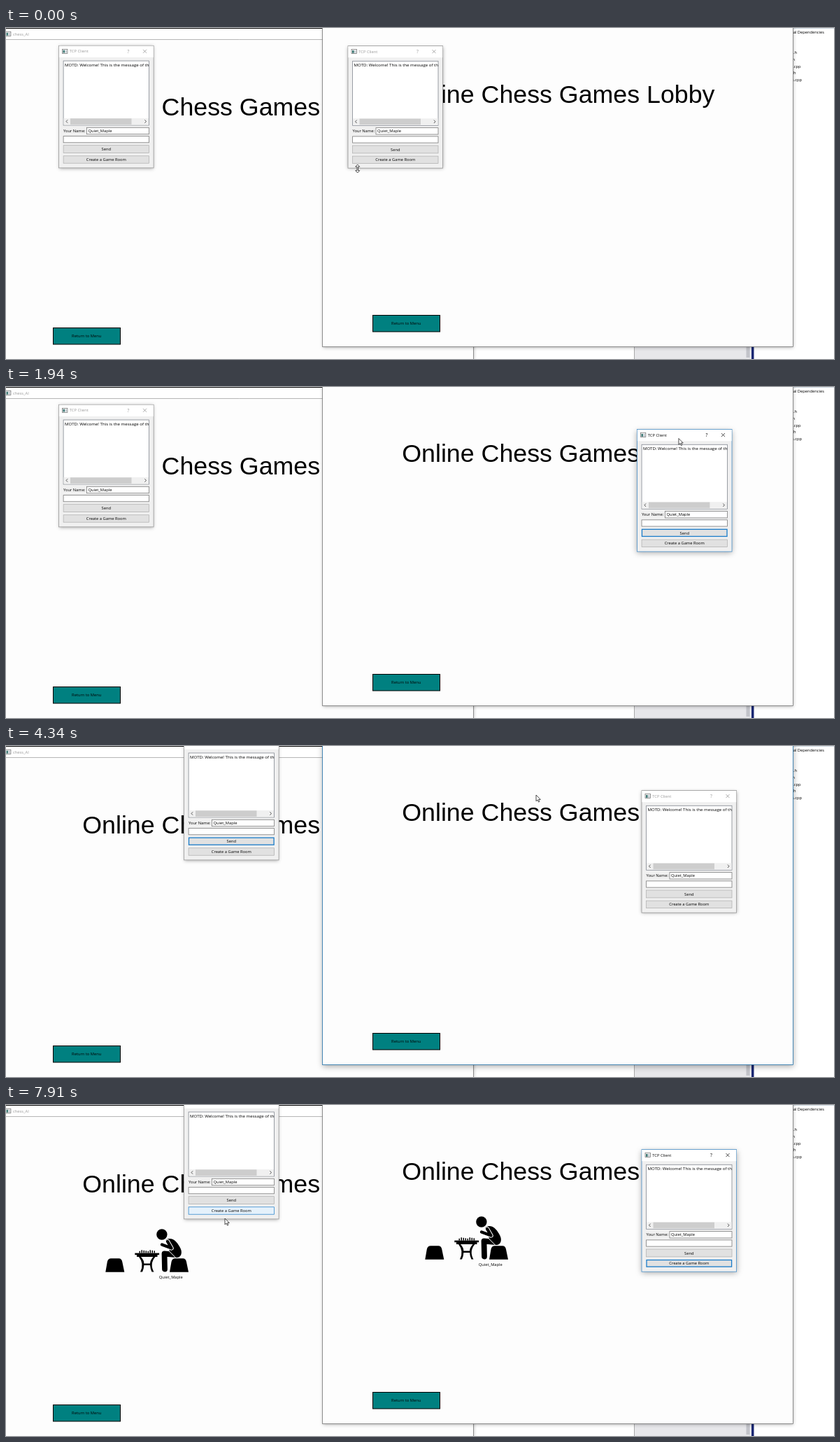
These frames come from a looping animation (1184 px wide and 473 px high, 7990 ms). An HTML page with a canvas:

```html
<!DOCTYPE html>
<html lang="en">
<head>
<meta charset="utf-8">
<title>Chess lobby</title>
<style>
  html, body { margin: 0; width: 100%; height: 100%; overflow: hidden; background: #fff; }
  canvas { display: block; }
</style>
</head>
<body>
<canvas id="stage" width="1184" height="473"></canvas>
<script>
const ctx = document.getElementById('stage').getContext('2d');
const LOOP = 7990, TICK = 77;
const PLAYER = 'Quiet_Maple';
const UI = '"Open Sans", "Noto Sans", sans-serif';
const BLUE = '#1a7cc9';

// Stops of the mouse: [time, x, y].
const mouseStops = [
  [100, 505, 209], [331, 526, 236], [480, 526, 236], [1250, 548.5, 38.5],
  [1330, 548.5, 38.5], [1640, 850, 44], [2025, 968.5, 76.5], [2102, 939, 76.5],
  [2487, 126.5, 35], [2718, 126.5, 35], [3026, 305.5, -2], [3103, 310, -14],
  [4181, 758, 70], [4412, 758, 70], [4874, 964, 226], [6645, 964, 226],
  [7184, 350, 135], [7380, 316, 152], [7900, 316, 152], [7901, 313, 162]
];
const leftDrag = { from: 2718, to: 3026, x: 75.5, y: 25.3 };
const rightDrag = { from: 1330, to: 2025, x: 489, y: 25.6 };

const clamp = (v, lo, hi) => Math.min(hi, Math.max(lo, v));

// Smooth curve through the stops that never overshoots them.
function mouseAxis(t, axis) {
  const last = mouseStops.length - 1;
  const slope = i => i < 0 || i >= last ? 0 :
    (mouseStops[i + 1][axis] - mouseStops[i][axis]) / (mouseStops[i + 1][0] - mouseStops[i][0]);
  const tangent = i => {
    const a = slope(i - 1), b = slope(i);
    return a * b > 0 ? 2 * a * b / (a + b) : 0;
  };
  t = clamp(t, mouseStops[0][0], mouseStops[last][0]);
  const i = clamp(mouseStops.findIndex(stop => stop[0] > t) - 1, 0, last - 1);
  if (t === mouseStops[last][0]) return mouseStops[last][axis];
  const span = mouseStops[i + 1][0] - mouseStops[i][0];
  const k = (t - mouseStops[i][0]) / span;
  const ease = k * k * (3 - 2 * k);
  return mouseStops[i][axis] * (1 - ease) + mouseStops[i + 1][axis] * ease +
    span * k * (1 - k) * (tangent(i) * (1 - k) - tangent(i + 1) * k);
}
const mouseAt = t => [mouseAxis(t, 1), mouseAxis(t, 2)];

// A dialog follows the mouse while it is dragged.
function dialogAt(drag, t) {
  const [gx, gy] = mouseAt(drag.from), [mx, my] = mouseAt(clamp(t, drag.from, drag.to));
  return [drag.x + mx - gx, drag.y + my - gy];
}

function box(x, y, w, h, fill, stroke, lineWidth = 0.8) {
  ctx.fillStyle = fill;
  ctx.fillRect(x, y, w, h);
  if (!stroke) return;
  ctx.strokeStyle = stroke;
  ctx.lineWidth = lineWidth;
  ctx.strokeRect(x, y, w, h);
}

function line(points, color, width) {
  ctx.beginPath();
  points.forEach(([x, y]) => ctx.lineTo(x, y));
  ctx.strokeStyle = color;
  ctx.lineWidth = width;
  ctx.stroke();
}

function text(string, x, y, { size = 5.75, color = '#000', align = 'left', font = UI } = {}) {
  ctx.font = `${size}px ${font}`;
  ctx.fillStyle = color;
  ctx.textAlign = align;
  ctx.fillText(string, x, y);
}

function cross(x, y, r, color) {
  line([[x - r, y - r], [x + r, y + r]], color, 0.7);
  line([[x - r, y + r], [x + r, y - r]], color, 0.7);
}

function appIcon(x, y) {
  box(x, y, 7.4, 6, '#fff', '#666', 0.7);
  box(x + 1, y + 1.4, 2.6, 3.8, '#3c7773');
  box(x + 4.2, y + 1.4, 2.2, 3.8, '#c4cbd2');
}

function frame(x, y, w, h, active, fill, border) {
  ctx.save();
  ctx.shadowColor = 'rgba(0,0,0,.34)';
  ctx.shadowBlur = active ? 8 : 5;
  ctx.shadowOffsetY = active ? 2 : 1;
  box(x, y, w, h, fill);
  ctx.restore();
  ctx.strokeStyle = border;
  ctx.lineWidth = 0.8;
  ctx.strokeRect(x, y, w, h);
}

function desktop() {
  box(0, 0, 1184, 473, '#fff');
  box(1126, 0, 58, 0.7, '#b8c6d2');
  text('External Dependencies', 1170, 8.1, { align: 'right' });
  [['.h', 1131], ['.h', 1128], ['.cpp', 1136.5], ['.h', 1129.5], ['.cpp', 1138]]
    .forEach(([name, x], i) => text('chess' + name, x, 37.2 + i * 9.65, { align: 'right' }));
  box(898, 450, 168, 23, '#e7e7ea');
  box(898, 450, 0.8, 23, '#999');
  box(1058.5, 450, 5, 21, '#c2c3c9');
  box(1066, 450, 3.5, 23, '#1b2873');
}

const torso = new Path2D('M228 193 C236 188 243 193 248 202 C254 211 250 219 243 218 L234 209Z');
const seat = new Path2D('M0 19.5 L2.5 5 Q3.5 0 8 0 H19 Q23 0 24 5 L27 19.5Z');
const tableLegs = new Path2D('M190 217 Q198 227 192 238.5 H195 Q197 235 197.4 229 H206' +
  ' Q206.5 235 208.5 238.5 H211.5 Q205 227 213.5 217 H210.5 Q206 222 206 226.5 H197.4 Q197.5 222 193 217Z');

// A black limb with a white gap around it.
function limb(points, width) {
  line(points, '#fff', width + 2);
  line(points, '#000', width);
}

function chessRoom() {
  ctx.save();
  ctx.lineJoin = ctx.lineCap = 'round';
  ctx.fillStyle = '#000';
  for (const x of [142.3, 234]) {
    ctx.save();
    ctx.translate(x, 219.2);
    ctx.fill(seat);
    ctx.restore();
  }
  ctx.fill(tableLegs);
  box(184.3, 211.6, 34.8, 2.6, '#000');
  box(187, 214, 29.5, 3, '#000');
  for (let i = 0; i < 8; i++) {
    const h = 2.8 + (i * 3 % 4) * 0.5;
    box(190.5 + i * 3, 211.6 - h, 1.5, h, '#000');
  }
  limb([[244, 214], [226.5, 212.5], [227, 234.5]], 7.8);
  ctx.lineWidth = 1.6;
  ctx.strokeStyle = '#fff';
  ctx.stroke(torso);
  ctx.fill(torso);
  limb([[231, 195], [236.5, 204.5], [223, 199.5]], 4.4);
  ctx.beginPath();
  ctx.arc(222.9, 185, 7.7, 0, 7);
  ctx.fill();
  ctx.restore();
  text(PLAYER, 235.8, 247.6, { align: 'center' });
}

// Both lobby windows show the same content, shifted.
function lobby(dx, dy, active, hasRoom) {
  ctx.save();
  ctx.translate(dx, dy);
  frame(-4.5, 0.5, 673, 473, active, '#fdfdfd', active ? '#1f6fa8' : '#777');
  box(-4, 1, 672, 15, '#fff');
  line([[-4, 16.5], [668, 16.5]], '#999', 0.7);
  appIcon(-0.5, 5.4);
  text('chess_AI', 10, 10.8, { color: '#999' });
  line([[606.5, 8.4], [611.5, 8.4]], '#777', 0.7);
  ctx.strokeStyle = '#ddd';
  ctx.strokeRect(630.5, 6, 4.6, 4.6);
  cross(656.5, 8.2, 2.4, '#777');
  text('Online Chess Games Lobby', 109.3, 125,
    { size: 35.75, font: '"Liberation Sans", Arial, sans-serif' });
  if (hasRoom) chessRoom();
  box(67.5, 428.5, 96, 23.5, '#008080', '#000', 1);
  text('Return to Menu', 115.2, 442.1, { align: 'center' });
  ctx.restore();
}

function button(label, y, h, isDefault, hovered) {
  const w = 122.4, x = 6.6;
  const inset = isDefault && !hovered ? 0.4 : 0;
  box(x + inset, y + inset, w - 2 * inset, h - 2 * inset, hovered ? '#e5f1fb' : '#e1e1e1',
    hovered || isDefault ? BLUE : '#adadad', inset ? 1.3 : 0.7);
  text(label, 67.8, y + h / 2 + 2.1, { align: 'center' });
}

function dialog([x, y], active, defaultButton, pointer) {
  const px = pointer[0] - x, py = pointer[1] - y;
  const over = (top, h) => px > 6 && px < 129 && py > top && py < top + h;
  const ink = active ? '#000' : '#999';
  ctx.save();
  ctx.translate(x, y);
  frame(0, 0, 135.6, 174.6, active, '#f0f0f0', active ? '#4a90c8' : '#999');
  box(0.4, 0.4, 134.8, 16.2, '#fff');
  appIcon(5, 5);
  text('TCP Client', 15.3, 10.1, { color: ink });
  text('?', 99.5, 10.3, { size: 6.6, color: ink, align: 'center' });
  cross(123, 8, 2.5, active ? '#000' : '#888');

  box(6.6, 21.7, 122.4, 92, '#fff', '#828790');
  ctx.save();
  ctx.beginPath();
  ctx.rect(7, 22, 122, 30);
  ctx.clip();
  text('MOTD: Welcome! This is the message of the day', 8.6, 29.5, { size: 6.1 });
  ctx.restore();
  box(7.1, 103.7, 121.4, 9.5, '#f0f0f0');
  box(16.5, 104, 87.5, 8.6, '#cdcdcd');
  line([[12.6, 106], [10.5, 108.2], [12.6, 110.4]], '#444', 0.9);
  line([[122.9, 106], [125, 108.2], [122.9, 110.4]], '#444', 0.9);

  text('Your Name:', 6.5, 123.8);
  box(40, 117, 89, 9.4, '#fff', '#7a7a7a');
  text(PLAYER, 42, 123.8);
  box(6.6, 129.3, 122.4, 9.2, '#fff', '#7a7a7a');
  button('Send', 142.4, 10.9, defaultButton === 'send', over(142.4, 10.9));
  button('Create a Game Room', 157.5, 10.4, defaultButton === 'create', over(157.5, 10.4));
  ctx.restore();
}

const arrow = new Path2D('M0 0 V8.8 L2 7 L3.5 10.1 L4.9 9.5 L3.5 6.5 H6.3Z');
const resizer = new Path2D('M0 -6 L3 -2.7 H.8 V2.7 H3 L0 6 L-3 2.7 H-.8 V-2.7 H-3Z');

function pointer([x, y], shape) {
  ctx.save();
  ctx.translate(x, y);
  ctx.fillStyle = '#fff';
  ctx.fill(shape);
  ctx.strokeStyle = '#222';
  ctx.lineWidth = 0.8;
  ctx.stroke(shape);
  ctx.restore();
}

function draw(time) {
  // The picture only advances on regular ticks until the mouse rests.
  const t = time < 100 ? 0 : time > 7400 ? time : 100 + TICK * Math.floor((time - 88) / TICK);
  const between = (a, b) => t >= a && t < b;
  const leftInFront = between(2750, 4240);
  const hasRoom = t >= 5100;
  const hoverPoint = mouseAt(t - TICK);
  const rightActive = between(1330, 2750) || t >= 5030;
  const rightDefault = between(1330, 3400) ? 'send' : t >= 5030 ? 'create' : '';

  const left = () => {
    lobby(0, 0, false, hasRoom);
    box(0, 0, 452, 0.9, '#000');
    dialog(dialogAt(leftDrag, t), leftInFront, between(2750, 4440) ? 'send' : '', hoverPoint);
  };
  const right = () => {
    lobby(457, -18, between(4240, 5030), hasRoom);
    dialog(dialogAt(rightDrag, t), rightActive, rightDefault, hoverPoint);
  };

  desktop();
  (leftInFront ? [right, left] : [left, right]).forEach(paint => paint());
  if (t < 100) pointer([502.7, 201], resizer);
  else pointer(mouseAt(t), arrow);
}

const start = performance.now();
function tick() {
  draw((performance.now() - start) % LOOP);
  requestAnimationFrame(tick);
}
tick();
</script>
</body>
</html>
```
